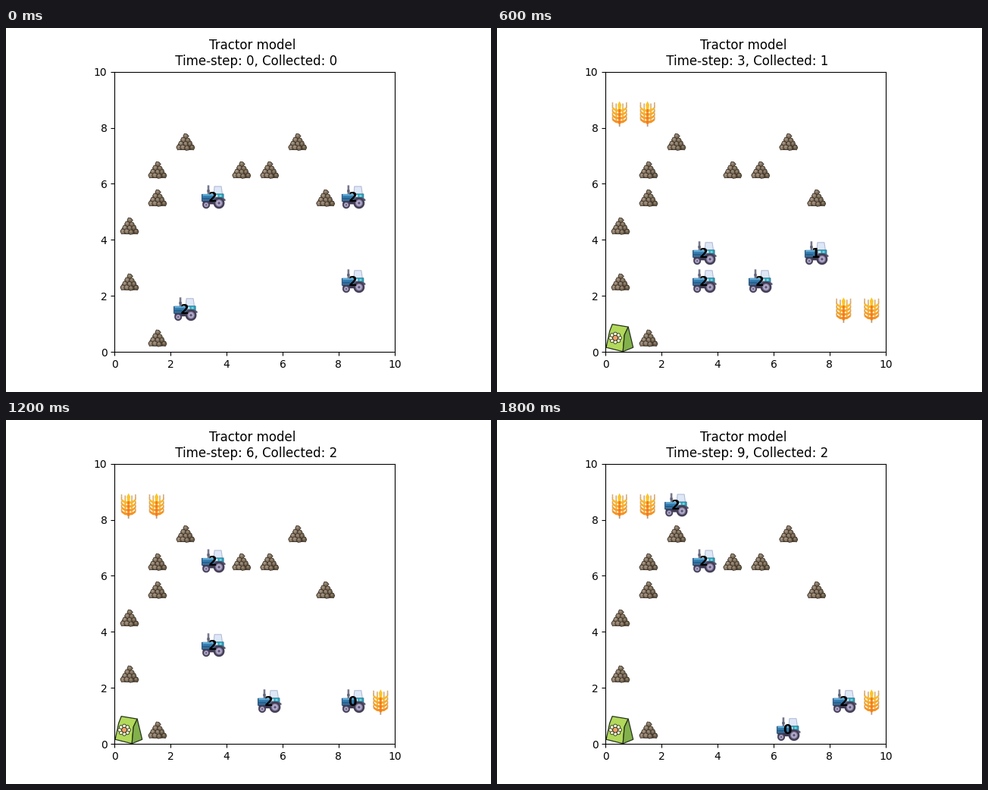
A matplotlib script for the animation above (2 s loop, 640 by 480 pixels).

```python
import numpy as np
import matplotlib.pyplot as plt
from matplotlib.animation import FuncAnimation
from matplotlib.collections import PolyCollection
from matplotlib.colors import to_rgb
from matplotlib.transforms import Affine2D

STEPS = 10
CELL = 36.96  # pixels per grid cell
MOVES = {"L": (-1, 0), "R": (1, 0), "U": (0, 1), "D": (0, -1), ".": (0, 0)}

ROCKS = [(0, 2), (0, 4), (1, 0), (1, 5), (1, 6), (2, 7), (4, 6), (5, 6), (6, 7), (7, 5)]
FIELDS = [(0, 8), (1, 8), (9, 1), (7, 4), (8, 1)]
LATE_FIELD, LATE_STEP = (8, 1), 3
HARVESTER = 2
STARTS = [(3, 5), (2, 1), (8, 5), (8, 2)]
ORDERS = ["DD.UUUUUL", "RU.DUUUUU", "DLDDDRDLL", "LLLLDRRRR"]


# Sprite parts are (points, fill, edge, line width), in pixels from the
# middle of a cell with y pointing down.
def poly(points, fill, edge="none", width=0.0):
    return np.array(points, float), fill, edge, width


def rect(x, y, w, h, fill, edge="none", width=0.0):
    return poly([(x, y), (x + w, y), (x + w, y + h), (x, y + h)], fill, edge, width)


def disc(x, y, r, fill, edge="none", width=0.0, n=24):
    a = np.linspace(0, 2 * np.pi, n, endpoint=False)
    return poly(np.column_stack([x + r * np.cos(a), y + r * np.sin(a)]), fill, edge, width)


def mix(a, b, t):
    return tuple((1 - t) * np.array(to_rgb(a)) + t * np.array(to_rgb(b)))


def wheel(x, y, r):
    rings = zip((1, 0.66, 0.5, 0.22), ("#443e57", "#8780a0", "#b3abc9", "#5b5474"))
    return [disc(x, y, r * k, color) for k, color in rings]


def tractor_parts():
    dark = "#3d3850"
    return [
        rect(-6.8, -16.5, 2.6, 12, "#74768a"),
        rect(-7.2, -10.5, 3.4, 3, "#5d5f74"),
        poly([(2.5, -15), (11.5, -15), (13, -4.5), (1.5, -4.5)], "#dde7f6", "#b3bdd6", 0.8),
        rect(1.5, -5, 13, 8, "#2aa4bc", "#2b6d8c", 0.6),
        rect(2, -4, 5, 7, "#c0e8ef"),
        rect(9, -4, 3, 5, "#62dbe0"),
        rect(-14, -4.5, 16.5, 9, "#3379ab", "#2b4f78", 0.7),
        rect(-13, -5, 15, 2.4, "#5fabd5"),
        rect(-13.5, 0.5, 10, 1.4, "#24557f"),
        rect(-13, 4, 20, 4.5, dark),
        poly([(1, 4), (4, -1), (12, -1), (17, 2), (17, 4)], "#565572"),
        *wheel(-8.4, 9.3, 5),
        *wheel(8.5, 7, 7.4),
    ]


def rock_parts():
    rng = np.random.default_rng(4)
    parts = [poly([(1, -10), (-11, 7), (-6, 11), (8, 11), (13, 7)], "#463b31")]
    for row in range(4):
        for i in range(row + 1):
            side = i - row / 2
            x, y = (1 + 5.8 * side, -7.4 + 5 * row) + rng.uniform(-0.7, 0.7, 2)
            face = mix("#8f7e6b", "#62543f", np.clip((x + 4) / 16, 0, 1))
            stone, *style = disc(0, 0, 3.7, face, "#40362c", 0.6, n=6)
            stone *= rng.uniform(0.8, 1.08, (6, 1))
            parts += [(stone + (x, y), *style),
                      poly(stone * 0.5 + (x - 0.5, y - 1), mix(face, "#c0b09c", 0.4))]
    return parts


def wheat_parts():
    parts = [rect(-0.9, 9, 1.8, 8, "#b99c7d")]
    for row in range(4):
        y = -7.5 + 5 * row
        color = mix("#fdbb22", "#f8921c", row / 3)
        for side in (-1, 1):
            arm = [(0, y + 2), (side * 5, y + 1.4), (side * 9.5, y - 2),
                   (side * 9.5, y + 1.4), (side * 5, y + 4.6), (0, y + 5.2)]
            parts += [poly(arm, color),
                      rect(side * 9.2 - 0.8, y - 3.4, 1.6, 3.6, "#d6a76c"),
                      rect(side * 4.4 - 0.8, y - 1.2, 1.6, 3, "#e6a848")]
        parts.append(rect(-1.5, y + 1, 3, 5, "#f47d1b"))
    for x, top in ((-9.2, -15), (-4.4, -13.5), (4.4, -13.5), (9.2, -15)):
        parts.append(rect(x - 0.8, top, 1.6, 5, "#d6ac78"))
    parts.append(poly([(0, -16.5), (2.4, -12), (1.6, -6), (-1.6, -6), (-2.4, -12)], "#fcc425"))
    return parts


def bag_parts():
    edge = "#26331b"
    top, fold, foot = (11.5, -14.5), (6.5, -4), (4.5, 18)
    parts = [
        poly([(-17.6, 12.5), (-13, -9), (-9.5, -18), top, fold, foot], "#b2d95b", edge, 0.9),
        poly([top, (18, 12.5), foot, fold], "#82b04b", edge, 0.9),
    ]
    cx, cy = -5.6, 0
    for a in np.arange(8) * np.pi / 4:
        parts.append(disc(cx + 6 * np.cos(a), cy + 5.2 * np.sin(a), 2.4, "#f8f2d8", edge, 0.6))
    return parts + [disc(cx, cy, 3.4, "#f4a06c", edge, 0.6)]


fig, ax = plt.subplots(figsize=(6.4, 4.8), dpi=100)
ax.set(xlim=(0, 10), ylim=(0, 10), aspect="equal")
title = ax.set_title("")


def move(place, cell):
    place.clear().scale(1 / CELL, -1 / CELL).translate(cell[0] + 0.5, cell[1] + 0.5)


def add_sprite(parts, cell, zorder=2):
    points, fills, edges, widths = zip(*parts)
    place = Affine2D()
    move(place, cell)
    art = PolyCollection(points, facecolors=fills, edgecolors=edges, linewidths=widths,
                         zorder=zorder, transform=place + ax.transData)
    art.set_snap(False)
    ax.add_collection(art, autolim=False)
    return art, place


def follow(start, orders):
    return np.cumsum([start] + [MOVES[o] for o in orders], axis=0)


for cell in ROCKS:
    add_sprite(rock_parts(), cell)
bag, _ = add_sprite(bag_parts(), (0, 0))
wheat = {cell: add_sprite(wheat_parts(), cell)[0] for cell in FIELDS}
routes = [follow(*plan) for plan in zip(STARTS, ORDERS)]
tractors = []
for route in routes:
    _, place = add_sprite(tractor_parts(), route[0], zorder=3)
    label = ax.text(0, 0, "", size=12, weight="bold", ha="center", va="center", zorder=4)
    tractors.append((place, label))


def draw(step):
    # Wheat is gathered as soon as the harvester drives onto its cell.
    visited = {tuple(cell) for cell in routes[HARVESTER][1:step + 1]}
    collected = len(visited & set(FIELDS))
    title.set_text(f"Tractor model \n Time-step: {step}, Collected: {collected}")
    bag.set_visible(step >= 1)
    for cell, art in wheat.items():
        first = LATE_STEP if cell == LATE_FIELD else 1
        art.set_visible(step >= first and cell not in visited)
    for i, (place, label) in enumerate(tractors):
        cell = routes[i][step]
        move(place, cell)
        label.set_position(cell + 0.5)
        label.set_text(str(2 - collected * (i == HARVESTER)))
    return []


anim = FuncAnimation(fig, draw, frames=STEPS, interval=200, repeat=True)
plt.show()
```
